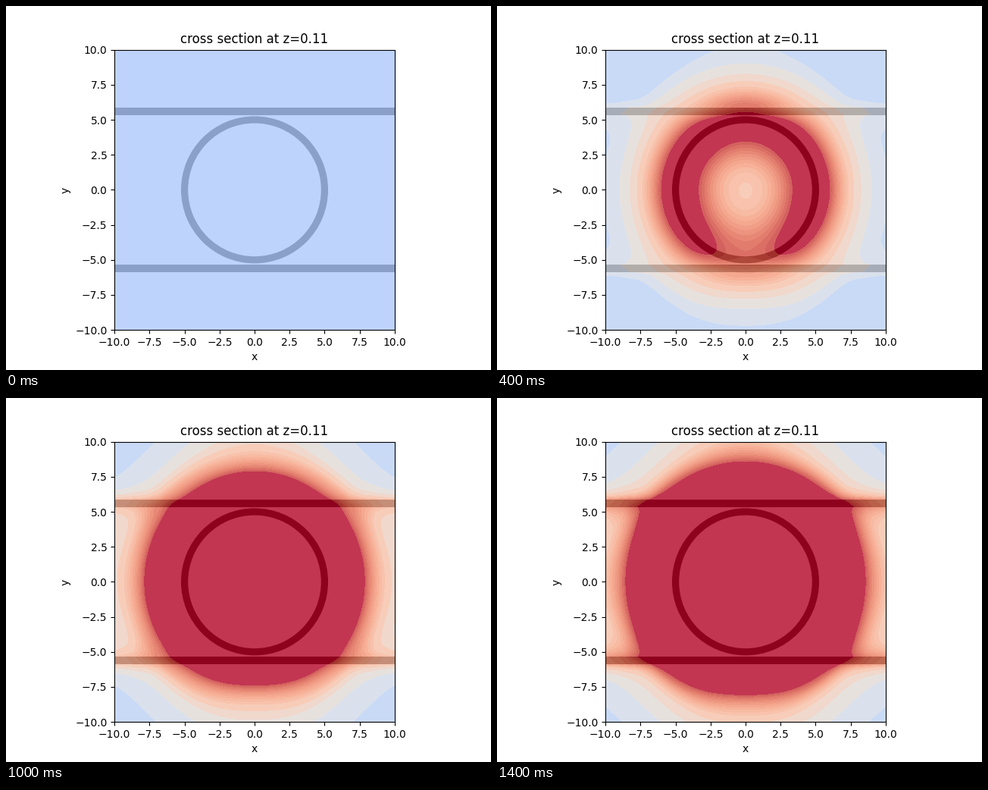
Write a matplotlib script that moves like this. It is 640 px wide and 480 px high and loops after 1.6 s.

```python
import numpy as np
import matplotlib.pyplot as plt
from matplotlib.animation import FuncAnimation
from matplotlib.colors import BoundaryNorm, ListedColormap
from matplotlib.patches import Rectangle, Wedge

FRAMES, INTERVAL = 8, 200
BASE = 0.344                      # value everywhere before growth starts
RING_R, BAR_Y, HALF = 5, 5.6, 0.255
PIXELS = 370

# coarse bands for the pale colours, finer ones towards the cap
edges = np.concatenate([[0.35], np.arange(0.43, 0.65, 0.0583),
                        np.linspace(0.663, 0.955, 11)])
coolwarm = plt.get_cmap("coolwarm")
bands = [BASE, *(edges[:-1] + edges[1:]) / 2, 1.0]
cmap = ListedColormap([coolwarm(v) for v in bands])
norm = BoundaryNorm([-1, *edges, 20], len(bands))


def ring_growth(x, y):
    """Growth per frame: a hot ring with a soft hollow and a long tail."""
    r = np.hypot(x, y)
    inside = 0.158 + 0.214 * np.sin(np.pi / 2 * np.minimum(r / RING_R, 1)) ** 2.6
    outside = 0.372 / (1 + (np.maximum(r - RING_R, 0) / 2.06) ** 2.15)
    diagonal = (2 * x * y / r ** 2) ** 2
    cooling = 1 - diagonal * np.clip((r - 8.8) / 4, 0, 0.3)
    return np.where(r < RING_R, inside, outside) * cooling


def growth(x, y):
    bar = 0.06 + 0.24 * np.exp(-(x / 5) ** 2)
    offset = np.abs(y) - BAR_Y
    gap = np.maximum(np.abs(offset) - HALF, 0)
    reach = np.where(offset > 0, 0.45, 0.9)
    s = ring_growth(x, y) + (bar - ring_growth(x, BAR_Y)) * np.exp(-gap / reach)
    depth = np.clip(-y / 4.5, 0, 1)          # weaker around the lower end
    dip = 0.2 * depth ** 2 * (3 - 2 * depth) * np.exp(-(x / 3.5) ** 2)
    return s * (1 - dip)


axis = (np.arange(PIXELS) + 0.5) * 20 / PIXELS - 10
RATE = growth(*np.meshgrid(axis, axis))

fig, ax = plt.subplots(figsize=(6.4, 4.8), dpi=100)
field = ax.imshow(BASE + 0 * RATE, cmap=cmap, norm=norm, alpha=0.8, zorder=1,
                  origin="lower", extent=(-10, 10, -10, 10), interpolation="nearest")

solid = dict(facecolor="black", edgecolor="none", zorder=0.5)
ax.add_patch(Wedge((0, 0), RING_R + 0.25, 0, 360, width=0.5, **solid))
for y in (-BAR_Y, BAR_Y):
    ax.add_patch(Rectangle((-10, y - HALF), 20, 2 * HALF, **solid))

ticks = np.linspace(-10, 10, 9)
ax.set(xlim=(-10, 10), ylim=(-10, 10), xticks=ticks, yticks=ticks,
       xlabel="x", ylabel="y", title="cross section at z=0.11")


def draw(i):
    field.set_data(BASE + i * RATE)
    return [field]


anim = FuncAnimation(fig, draw, frames=FRAMES, interval=INTERVAL,
                     init_func=lambda: draw(0), repeat=True, repeat_delay=0)
plt.show()
```
